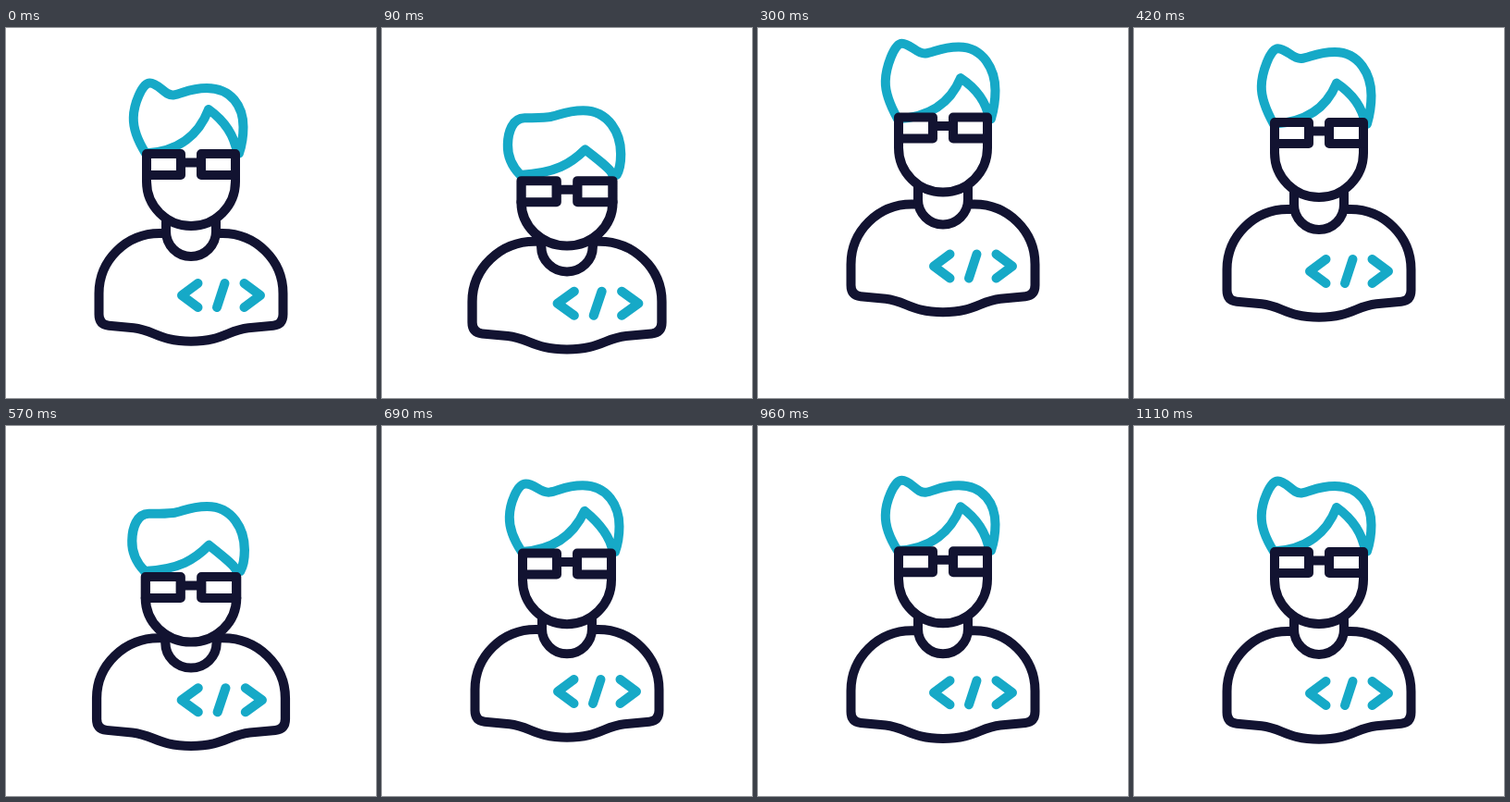
An HTML page for the animation above (1140 ms loop, 400 by 400 pixels).

```html
<!DOCTYPE html>
<html lang="en">
<head>
<meta charset="utf-8">
<title>Developer jump</title>
<style>
  html, body { margin: 0; width: 100%; height: 100%; overflow: hidden; background: #fff; }
  svg { display: block; width: 100%; height: 100%; }
  path { fill: none; stroke: #121331; stroke-width: 10; stroke-linecap: round; stroke-linejoin: round; }
  .teal { stroke: #16a9c7; }
</style>
</head>
<body>
<svg viewBox="0 0 400 400">
  <g id="figure">
    <path id="hair" class="teal"/>
    <g id="torso">
      <path d="M173 222H166C130 222 100.5 251 100.5 287V309.5Q100.5 320.5 111 321.7L138 324.3C160 326.5 166 338.7 200 338.7C234 338.7 240 326.5 262 324.3L289 321.7Q299.5 320.5 299.5 309.5V287C299.5 251 270 222 234 222H227"/>
      <path class="teal" d="M207.5 276L190 289L207.5 302M236.5 276L228 302M257.5 276L275 289L257.5 302"/>
    </g>
    <path id="neck"/>
    <path id="jaw"/>
    <path id="glasses" d="M152 136H189V159H152ZM211 136H248V159H211ZM189 145.5H211"/>
  </g>
</svg>
<script>
const LOOP = 1140, STEP = 30;

// time, torso offset, press (how far the head sinks into the torso)
const KEYS = [
  [0, 0, 0],
  [100, 9, 21],
  [180, -13, 14],
  [300, -31.5, -8],
  [350, -39, -8],
  [420, -26, -8],
  [600, 9, 22],
  [720, -4, 0],
  [810, -2, 0],
  [LOOP, 0, 0]
];

const $ = id => document.getElementById(id);
const draw = (id, d) => $(id).setAttribute('d', d);
const move = (id, y) => $(id).setAttribute('transform', `translate(0 ${y})`);
const clamp = v => Math.min(1, Math.max(0, v));

const rate = (i, c) => (KEYS[i + 1][c] - KEYS[i][c]) / (KEYS[i + 1][0] - KEYS[i][0]);

// Monotone tangent: flat at turning points, harmonic mean elsewhere
function tangent(i, c) {
  if (i === 0 || i === KEYS.length - 1) return 0;
  const a = rate(i - 1, c), b = rate(i, c);
  return a * b <= 0 ? 0 : 2 * a * b / (a + b);
}

function curve(t, c) {
  let i = 0;
  while (t >= KEYS[i + 1][0]) i++;
  const a = KEYS[i], b = KEYS[i + 1], span = b[0] - a[0];
  const u = (t - a[0]) / span;
  return a[c] + (b[c] - a[c]) * u * u * (3 - 2 * u)
    + span * u * (1 - u) * ((1 - u) * tangent(i, c) - u * tangent(i + 1, c));
}

function hairPath(eye, press) {
  const strain = clamp(Math.abs(press) / 8), flat = clamp(press / 14);
  const quiff = eye - 85.5 + 0.42 * press;
  const dip = eye - 72.5 - 5.5 * strain;
  const crown = eye - 80 - 5 * strain;
  const tip = eye - 57 + 0.7 * Math.abs(press);
  const base = eye - 9.5 - 0.28 * press;
  const drop = base - tip;
  return `M151 ${base}C140 ${eye - 27} 137.5 ${eye - 38} 137.8 ${eye - 48}`
    + `C138 ${eye - 62} ${147 - 4 * flat} ${quiff} 155.5 ${quiff}`
    + `C165 ${quiff} 172 ${dip + 1} 181 ${dip}`
    + `C190 ${dip - 1} 198 ${crown} 217 ${crown}`
    + `C244 ${crown} 256.5 ${eye - 60} 256.5 ${eye - 38}`
    + `Q256.5 ${eye - 23} 252 ${base}H${250 - 2 * flat}`
    + `C247 ${tip + drop * (0.61 + 0.2 * flat)} 237 ${tip + drop * (0.27 + 0.25 * flat)} 219 ${tip}`
    + `C${209 - 5 * flat} ${tip + drop * 0.55} 188 ${base - 2} 151 ${base}`;
}

function render(t) {
  const torso = curve(t, 1), press = curve(t, 2);
  const head = torso + press, eye = 145 + head, rim = eye + 14;
  const jaw = eye + 69 - 0.375 * press;
  const cheek = jaw - Math.min(48, jaw - rim);
  const collar = jaw + 6 - 0.25 * press;
  const wide = 1 + 0.0034 * Math.max(0, torso);

  $('figure').setAttribute('transform', `translate(200 0) scale(${wide} 1) translate(-200 0)`);
  move('torso', torso);
  move('glasses', head);
  draw('jaw', `M152 ${rim}V${cheek}A48 ${jaw - cheek} 0 0 0 248 ${cheek}V${rim}`);
  draw('neck', `M173 ${jaw - 8}V${collar}A27 27 0 0 0 227 ${collar}V${jaw - 8}`);
  draw('hair', hairPath(eye, press));
}

const start = performance.now();
function tick() {
  const t = (performance.now() - start) % LOOP;
  render(Math.floor(t / STEP) * STEP);
  requestAnimationFrame(tick);
}
tick();
</script>
</body>
</html>
```
